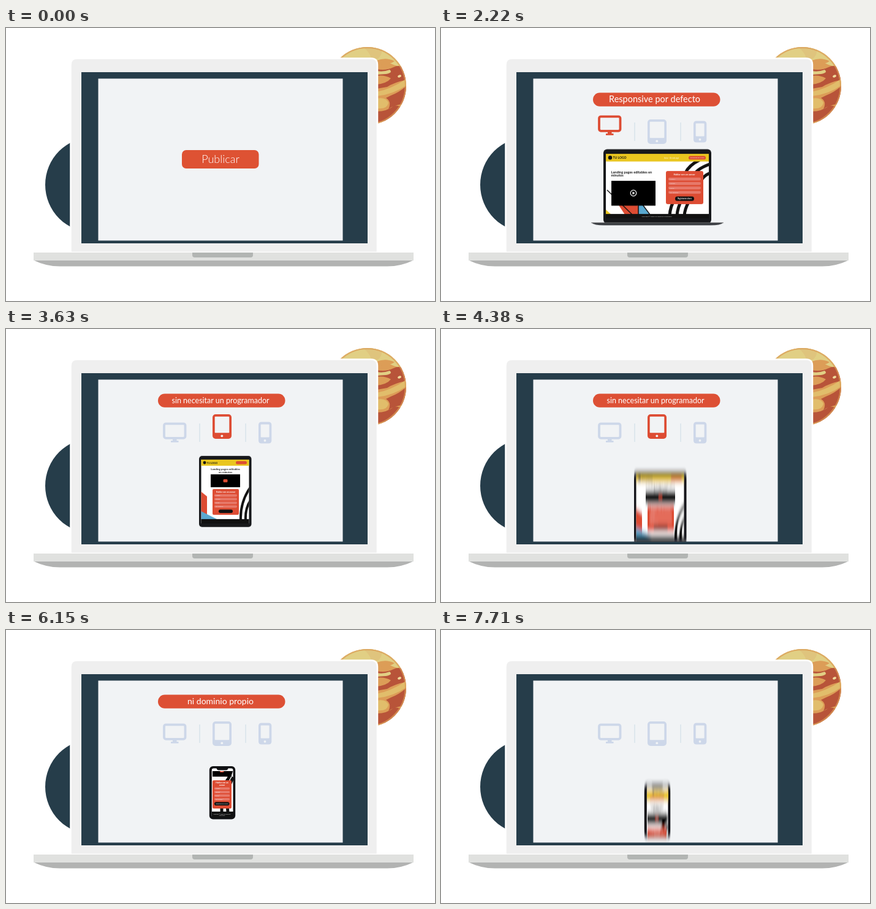
Write an HTML page that moves like this. It is 700 px wide and 445 px high and loops after 7740 ms.

```html
<!DOCTYPE html>
<html lang="es">
<head>
<meta charset="utf-8">
<title>Publicar</title>
<style>
html, body { margin: 0; width: 100%; height: 100%; overflow: hidden; background: #fff; }
svg { display: block; width: 700px; height: 445px; font-family: Lato, "Open Sans", sans-serif; }
text { fill: #fff; }
.mid { text-anchor: middle; }
.bold { font-weight: 700; }
.ink { fill: #111; }
.red { fill: #dd4c33; }
.sun { fill: #eac61f; }

.loop, .type { animation: 7740ms linear infinite both; }
.type { animation-name: type; }
@keyframes type { 0% { fill-opacity: 0 } .5%, 50% { fill-opacity: 1 } 50.01%, 100% { fill-opacity: 0 } }

#btn { animation-name: btn; transform-box: fill-box; transform-origin: center; }
@keyframes btn {
  0%, 6.4%, 8%, 9.1% { transform: none } 7.2% { transform: scale(.92) }
  10.7%, 100% { transform: scale(0) }
}
#cursor { animation-name: cursor; }
@keyframes cursor {
  0%, .7% { transform: translate(556px, 308px); opacity: 1; animation-timing-function: ease-in-out }
  6.2%, 10.9% { transform: translate(372px, 217px); opacity: 1 }
  14%, 100% { transform: translate(470px, 262px); opacity: 0 }
}

/* heading pills */
.pill { --out: translateY(-46px); }
#pill1 { animation-name: pill1; }
#pill2 { animation-name: pill2; }
#pill3 { animation-name: pill3; }
@keyframes pill1 {
  0%, 14.73% { transform: var(--out); animation-timing-function: cubic-bezier(.33,.67,.67,1) }
  20.16%, 31.01% { transform: none } 32.56%, 100% { transform: var(--out) }
}
@keyframes pill2 {
  0%, 32.56% { transform: var(--out); animation-timing-function: cubic-bezier(.33,.67,.67,1) }
  34.88%, 61.63% { transform: none } 63.18%, 100% { transform: var(--out) }
}
@keyframes pill3 {
  0%, 63.18% { transform: var(--out); animation-timing-function: cubic-bezier(.33,.67,.67,1) }
  65.89%, 94.3% { transform: none } 96.9%, 100% { transform: var(--out) }
}

/* icon row */
#row { animation-name: row; }
@keyframes row {
  0%, 10.85% { transform: translateY(37.5px); opacity: 0 }
  13.5%, 20.93% { transform: translateY(37.5px); opacity: 1; animation-timing-function: ease-in-out }
  25.2%, 100% { transform: none; opacity: 1 }
}
.icon { --up: translateY(-10px); color: #cdd7e9; }
#desk { animation-name: desk; }
#tab { animation-name: tab; }
#cell { animation-name: cell; }
@keyframes desk {
  0%, 26.5%, 43.5%, 100% { transform: none; color: #cdd7e9 }
  28.4%, 41.6% { transform: var(--up); color: #dd4c33 }
}
@keyframes tab {
  0%, 45%, 59.3%, 100% { transform: none; color: #cdd7e9 }
  46.9%, 57.4% { transform: var(--up); color: #dd4c33 }
}
@keyframes cell {
  0%, 59.7%, 71.58%, 100% { transform: none; color: #cdd7e9 }
  61.6%, 70.28% { transform: var(--up); color: #dd4c33 }
  70.93% { transform: translateY(-5px); color: #dd4c33 }
}

/* devices rise, then drop with growing speed */
.device { --low: translateY(160px); }
#laptop { animation-name: laptop; }
#tablet { animation-name: tablet; }
#phone { animation-name: phone; }
@keyframes laptop {
  0%, 24% { transform: var(--low); animation-timing-function: cubic-bezier(.2,.9,.4,1) }
  29.1% { transform: none }
  41.34% { transform: none; animation-timing-function: cubic-bezier(.33,0,.67,.33) }
  43.15%, 100% { transform: var(--low) }
}
@keyframes tablet {
  0%, 44.44% { transform: var(--low); animation-timing-function: cubic-bezier(.2,.9,.4,1) }
  48.06% { transform: none }
  55.81% { transform: none; animation-timing-function: cubic-bezier(.33,0,.67,.33) }
  57.64%, 100% { transform: var(--low) }
}
@keyframes phone {
  0%, 58.14% { transform: var(--low); animation-timing-function: cubic-bezier(.2,.9,.4,1) }
  61.63% { transform: none }
  98.84% { transform: none; animation-timing-function: cubic-bezier(.33,0,.67,.33) }
  100% { transform: translateY(65px) }
}
.blur { animation-timing-function: step-end; }
#laptop .blur { animation-name: blur1; }
#tablet .blur { animation-name: blur2; }
#phone .blur { animation-name: blur3; }
@keyframes blur1 { 0%, 41.5% { filter: url(#smear) } 26%, 100% { filter: none } }
@keyframes blur2 { 0%, 56% { filter: url(#smear) } 46%, 100% { filter: none } }
@keyframes blur3 { 0%, 99% { filter: url(#smear) } 60%, 98.9% { filter: none } }
#page { animation-name: scroll; }
@keyframes scroll {
  0%, 71.5% { transform: none; animation-timing-function: ease-in-out }
  78.5%, 83% { transform: translateY(-48px); animation-timing-function: ease-in-out }
  91%, 100% { transform: none }
}
</style>
</head>
<body>
<svg viewBox="0 0 700 445" xmlns="http://www.w3.org/2000/svg">
  <defs>
    <clipPath id="stage"><rect x="150.5" y="82.5" width="399" height="264"/></clipPath>
    <clipPath id="ball"><circle cx="589.5" cy="94.5" r="63.5"/></clipPath>
    <clipPath id="lapView"><rect x="269" y="205" width="168" height="105"/></clipPath>
    <clipPath id="tabView"><rect x="318.5" y="210" width="78" height="104"/></clipPath>
    <clipPath id="cellView"><rect x="336" y="230" width="34.5" height="75.5"/></clipPath>
    <filter id="smear" x="-5%" y="-20%" width="110%" height="140%"><feGaussianBlur stdDeviation="0 5"/></filter>
  </defs>

  <!-- planet -->
  <g clip-path="url(#ball)">
    <rect x="525" y="30" width="130" height="130" fill="#dc9d57"/>
    <path d="M525 30H655V62Q640 64 628 58T606 62L525 64Z" fill="#e1cf84"/>
    <path d="M582 30H612Q616 42 607 50H596Q594 40 582 30Z" fill="#dfc47d"/>
    <path d="M605 53Q620 47 634 54Q626 60 615 59L605 62Z" fill="#dc9d57"/>
    <path d="M605 67Q620 70 632 64T655 68V84Q634 88 622 96L605 99V92Q622 90 628 82Q618 76 605 78Z" fill="#b85439"/>
    <path d="M605 70Q616 72 626 68Q632 73 620 75L605 76Z" fill="#e1cf84"/>
    <ellipse cx="642" cy="78.500" rx="3" ry="2" transform="rotate(-25 642 78.500)" fill="#f0dc9c"/>
    <path d="M605 104Q628 100 655 82V92Q634 108 605 111Z" fill="#e1bd6b"/>
    <path d="M628 110Q642 105 655 93V125Q640 122 624 132Q630 120 620 114Z" fill="#b85439"/>
    <path d="M605 115Q620 112 624 122Q622 133 605 131Z" fill="#e1bd6b"/>
    <path d="M605 136Q622 136 634 126L646 128L625 150L605 154Z" fill="#b85439"/>
    <circle cx="589.5" cy="94.5" r="62.5" fill="none" stroke="#dc9d57" stroke-width="2.500" stroke-opacity=".7"/>
  </g>
  <circle cx="141.700" cy="255.5" r="77.700" fill="#263d4a"/>

  <!-- big laptop -->
  <path d="M105.500 366V60Q105.500 49.500 116 49.500H596Q606 49.500 606 60V366Z" fill="#efefef" stroke="#fff" stroke-width="2.500"/>
  <rect x="123" y="72" width="467" height="279" fill="#263d4a"/>
  <rect x="150.5" y="82.5" width="399" height="264" fill="#f1f3f5"/>
  <path d="M45 378.500H665Q645 388.500 622 388.500H88Q65 388.500 45 378.500Z" fill="#b2b3b2"/>
  <rect x="45" y="366" width="620" height="13" fill="#e0e1df"/>
  <path d="M304 366H403V370Q403 374 399 374H308Q304 374 304 370Z" fill="#b2b5b3"/>

  <g clip-path="url(#stage)">
    <g id="btn" class="loop">
      <rect x="287" y="199" width="125.500" height="30" rx="7" fill="#de5233"/>
      <text class="mid" x="350" y="219.800" font-size="18" font-weight="300">Publicar</text>
    </g>

    <!-- small laptop -->
    <g id="laptop" class="device loop"><g class="blur loop">
      <rect x="265" y="197.500" width="176" height="121" rx="6" fill="#17181b"/>
      <g clip-path="url(#lapView)">
        <rect x="269" y="205" width="168" height="105" fill="#fff"/>
        <g fill="none" stroke="#111" stroke-width="5">
          <path d="M399 236Q404 224 422 215M410 243Q416 230 438 222M424 250Q428 240 440 236"/>
          <path d="M373 306Q374 290 382 278M385 306Q386 292 393 280M397 306Q398 294 404 284"/>
        </g>
        <path class="sun" d="M269 296L278 304H269Z"/>
        <path class="red" d="M279 272L322 290V304H300Z"/>
        <path d="M322 289H330L340 304H322Z" fill="#5aa9d0"/>
        <path d="M271 264L312 304M322 288V304M329 288L341 304" stroke="#111" stroke-width="1.500"/>
        <rect class="sun" x="269" y="205" width="168" height="12.500"/>
        <circle class="ink" cx="276" cy="211.300" r="3.200"/>
        <text class="ink bold" x="280.500" y="213.300" font-size="5">TU LOGO</text>
        <text x="364" y="212.500" font-size="2.800">Inicio · Ver más aquí</text>
        <rect class="red" x="404" y="208.500" width="28" height="5.800" rx="2.900"/>
        <text class="mid bold" x="418" y="212.400" font-size="2.600">Comenzar por ahora</text>
        <text class="ink bold" font-size="5.600"><tspan x="277.500" y="237">Landing pages editables en</tspan><tspan x="277.500" y="242.300">minutos</tspan></text>
        <rect x="278" y="249" width="72" height="40.500" fill="#000"/>
        <circle cx="314" cy="269" r="4.800" fill="none" stroke="#fff" stroke-width="1.200"/>
        <path d="M312.500 266.500L316.600 269L312.500 271.500Z" fill="#fff"/>
        <rect class="red" x="367" y="233" width="61" height="54" rx="3"/>
        <text class="mid bold" x="397" y="239.500" font-size="3.800">Hablar con un asesor</text>
        <g data-fields="371 243.8 53 7.200"></g>
        <rect class="ink" x="382" y="274.500" width="31" height="7.300" rx="3.600"/>
        <text class="mid bold" x="397.500" y="279.100" font-size="2.800">Registrarme ahora</text>
        <rect class="ink" x="269" y="303" width="168" height="7"/>
        <text class="mid" x="352" y="307.600" font-size="2.600">Copyright © Todos los derechos reservados</text>
      </g>
      <path d="M245 317H461Q456 321.500 440 321.500H266Q250 321.500 245 317Z" fill="#393c41"/>
      <path d="M245 317.300H461" stroke="#777" stroke-width=".8"/>
    </g></g>

    <!-- tablet -->
    <g id="tablet" class="device loop"><g class="blur loop">
      <rect x="315" y="204" width="85.500" height="116" rx="5" fill="#17181b"/>
      <g clip-path="url(#tabView)">
        <rect x="318" y="210" width="79" height="105" fill="#fff"/>
        <path class="red" d="M318 262L328 270V306H318Z"/>
        <path d="M318 294L346 308H318Z" fill="#5aa9d0"/>
        <path d="M383 308Q382 280 398 256M391 308Q390 290 399 276" fill="none" stroke="#111" stroke-width="4"/>
        <rect class="sun" x="318" y="210" width="79" height="10"/>
        <circle class="ink" cx="324" cy="215" r="2.400"/>
        <text class="ink bold" x="327.500" y="216.600" font-size="4">TU LOGO</text>
        <rect class="red" x="375" y="212.500" width="18" height="5" rx="2.500"/>
        <text class="ink bold mid" font-size="4.500"><tspan x="358" y="227">Landing pages editables</tspan><tspan x="358" y="231.500">en minutos</tspan></text>
        <rect x="334" y="234" width="48" height="21" fill="#000"/>
        <rect class="red" x="354.500" y="242" width="7" height="5" rx="1.500"/>
        <rect class="red" x="337" y="258" width="43" height="42" rx="2"/>
        <text class="mid bold" x="358.500" y="263.500" font-size="3.400">Hablar con un asesor</text>
        <g data-fields="340 266.500 37 6"></g>
        <rect class="ink" x="347" y="291.500" width="23" height="5.500" rx="2.700"/>
        <rect class="ink" x="318" y="307" width="79" height="7"/>
      </g>
    </g></g>

    <!-- phone -->
    <g id="phone" class="device loop"><g class="blur loop">
      <rect x="331.800" y="222" width="42.400" height="86.500" rx="6" fill="#101114"/>
      <rect x="335.800" y="225.500" width="34.700" height="80" rx="3" fill="#fff"/>
      <g clip-path="url(#cellView)"><g id="page" class="loop">
        <path d="M369 272Q364 296 352 300V345M371 288Q358 308 362 345" fill="none" stroke="#111" stroke-width="5"/>
        <rect class="sun" x="335" y="231" width="36" height="18"/>
        <circle class="ink" cx="346.500" cy="235.500" r="2"/>
        <text class="ink bold" x="349.500" y="237" font-size="3.400">TU LOGO</text>
        <rect class="red" x="341" y="242.500" width="23" height="4.600" rx="2.300"/>
        <text class="mid bold" x="352.500" y="245.700" font-size="2.300">Comenzar por ahora</text>
        <text class="ink bold mid" font-size="3.500"><tspan x="352.500" y="258">Landing pages</tspan><tspan x="352.500" y="261.700">editables en</tspan><tspan x="352.500" y="265.400">minutos</tspan></text>
        <rect x="337" y="269" width="31" height="18" fill="#000"/>
        <rect class="red" x="349" y="275.500" width="6.500" height="4.600" rx="1.300"/>
        <path d="M351.500 276.500L354 277.800L351.500 279.100Z" fill="#fff"/>
        <rect class="red" x="337" y="293" width="31" height="46" rx="2"/>
        <text class="bold mid" font-size="3.300"><tspan x="352.500" y="298.200">Hablar con un</tspan><tspan x="352.500" y="302">asesor</tspan></text>
        <g data-fields="340 304.500 25 5.800"></g>
        <rect class="ink" x="340" y="328.500" width="24.500" height="5.600" rx="2.800"/>
        <text class="mid bold" x="352.500" y="332.200" font-size="2.500">Registrarme ahora</text>
        <rect class="ink" x="335" y="344" width="36" height="12"/>
        <text class="mid" font-size="2"><tspan x="352.500" y="348.500">Copyright © Todos los derechos</tspan><tspan x="352.500" y="351">reservados</tspan></text>
      </g></g>
      <path d="M343 224H363Q362 228.500 359 228.500H347Q344 228.500 343 224Z" fill="#101114"/>
    </g></g>

    <!-- icon row -->
    <g id="row" class="loop">
      <path d="M316 154V184M391 154V184" stroke="#d5e0e9" stroke-width="1.300"/>
      <g id="desk" class="icon loop">
        <rect x="258" y="154.300" width="34.500" height="23.500" rx="3" fill="none" stroke="currentColor" stroke-width="3.800"/>
        <path d="M272 179H278.500V182H281.500V184.700H269V182H272Z" fill="currentColor"/>
      </g>
      <g id="tab" class="icon loop">
        <rect x="337" y="149" width="31" height="40" rx="5" fill="currentColor"/>
        <rect x="340.700" y="152.800" width="23.600" height="26.500" rx="1" fill="#f1f3f5"/>
        <circle cx="352.300" cy="184.300" r="1.900" fill="#f1f3f5"/>
      </g>
      <g id="cell" class="icon loop">
        <rect x="412" y="151.500" width="21.300" height="35" rx="4.500" fill="currentColor"/>
        <rect x="415.700" y="155.500" width="13.900" height="21" rx="1" fill="#f1f3f5"/>
        <circle cx="422.500" cy="181.800" r="1.900" fill="#f1f3f5"/>
      </g>
    </g>

    <g id="pills"></g>
    <path id="cursor" class="loop" d="M0 0V16L4 12.500L7 19L10 17.500L7 11.500H12Z" fill="#263d4a" stroke="#fff"/>
  </g>
</svg>
<script>
const add = (parent, tag, attrs, text = "") => {
  const el = document.createElementNS("http://www.w3.org/2000/svg", tag);
  for (const key in attrs) el.setAttribute(key, attrs[key]);
  el.textContent = text;
  return parent.appendChild(el);
};

// Form inputs: left, top, width, row step
for (const form of document.querySelectorAll("[data-fields]")) {
  const [x, y, width, step] = form.dataset.fields.split(" ").map(Number);
  ["Nombre *", "Apellido *", "Correo *", "+00  Teléfono *"].forEach((label, i) => {
    const top = y + i * step;
    add(form, "rect", { x, y: top, width, height: step * .65, rx: step * .3, fill: "#e7796a" });
    add(form, "text", { x: x + 1.5, y: top + step * .47, "font-size": step * .36 }, label);
  });
}

// Headings typed one letter each 30 ms: text, left, font size, start
const pills = document.getElementById("pills");
[
  ["Responsive por defecto", 274, 14.5, 1270],
  ["sin necesitar un programador", 270.5, 12.5, 2590],
  ["ni dominio propio", 296, 14, 5020]
].forEach(([words, x, size, start], n) => {
  const pill = add(pills, "g", { id: "pill" + (n + 1), class: "pill loop" });
  add(pill, "rect", { x: 248, y: 105.5, width: 207.5, height: 22.3, rx: 11.1, fill: "#dd5035" });
  const line = add(pill, "text", { x, y: 121, "font-size": size });
  [...words].forEach((letter, i) =>
    add(line, "tspan", { class: "type", style: `animation-delay:${start + i * 30}ms` }, letter));
});
</script>
</body>
</html>
```
